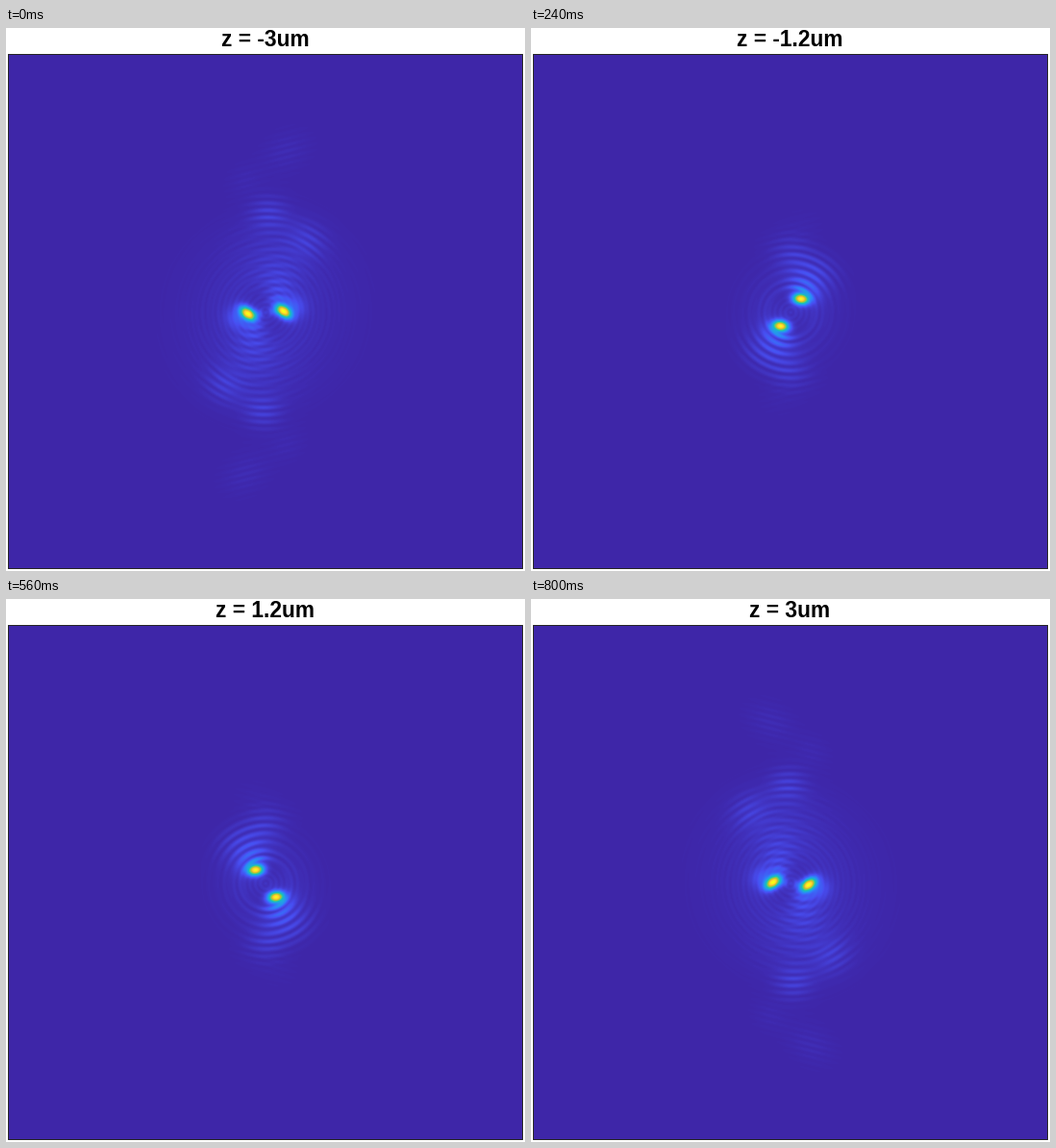
A matplotlib script for the animation above (880 ms loop, 540 px wide and 565 px high).

```python
import numpy as np
import matplotlib.pyplot as plt
from matplotlib.animation import FuncAnimation
from matplotlib.colors import LinearSegmentedColormap
from matplotlib.patches import Rectangle

W, H, DPI = 540, 565, 100
FRAMES, INTERVAL = 11, 80
LEFT, RIGHT, TOP, BOTTOM = 2, 538, 27, 563
CX, CY = 270.3, 296
DEPTH = 3

COLORS = LinearSegmentedColormap.from_list("blue_yellow", [
    "#3e26a8", "#484df0", "#327cfc", "#20a5e2", "#19bfb6",
    "#64cd6f", "#c5c22a", "#fec934", "#f9fb15"])


def gauss(x, y, x0, y0, sx, sy, tilt=0):
    t = np.radians(tilt)
    dx, dy = x - x0, y - y0
    u = dx * np.cos(t) + dy * np.sin(t)
    v = dy * np.cos(t) - dx * np.sin(t)
    return np.exp(-0.5 * ((u / sx) ** 2 + (v / sy) ** 2))


def ripple(r, period, contrast=1):
    return 1 - contrast * (0.5 - 0.5 * np.cos(2 * np.pi * r / period))


def sigmoid(v):
    return 1 / (1 + np.exp(-np.clip(v, -50, 50)))


def lobe(x, y, s):
    """Bright spot that turns a quarter circle as s goes from 0 to 1."""
    a = np.radians(90 - 86 * s - 4 * np.sin(2 * np.pi * s))
    radius = 17.5 + (2 * s - 1) ** 2
    lx, ly = radius * np.cos(a), radius * np.sin(a)
    spot = gauss(x, y, lx, ly, 3.8 + 2.6 * np.sin(2 * s), 3.8, -38 * s ** 1.8)
    side = gauss(x, y, lx + 9, ly + 4, 9, 8)
    link = gauss(x, y, 8, 1, 4, 3)
    return 0.92 * spot + 0.13 * s * side + 0.1 * s ** 3 * link


def arcs(x, y, s, reach):
    """Fan of curved fringes outside the lobe."""
    dx, dy = x - (14 * s ** 2 - 1), y - (4 - 8 * s)
    r = np.hypot(dx, dy)
    turn = np.arctan2(dy, dx) - np.radians(90 - 25 * np.sin(np.pi * s))
    fan = np.exp((np.cos(turn) - 1) / 0.38 ** 2) + 0.06
    gap = r - (26 - 6 * s ** 3)
    fade = np.exp(-np.maximum(gap, 0) / (8 + 45 * s))
    window = sigmoid((gap + 5) / 1.5) * sigmoid((reach - r) / 5)
    strength = 0.1 + 0.32 * (1 - s) ** 2
    return strength * fan * fade * window * ripple(gap, 8.4, 1 - 0.35 * s)


def patches(x, y, s, tip):
    """Weak striped patches at the tip, the shoulder and far out."""
    rows = ripple(np.hypot(x, y), 7.6, 0.8)
    out = (0.04 + 0.04 * s) * rows * gauss(x, y, 3 * s, tip, 13, 12)
    out += 0.07 * s * rows * gauss(x, y, 24 + 18 * s, 22 + 53 * s, 14, 12, -35)
    stripes = s * ripple(y - 0.25 * x, 6.5, 0.6)
    out += 0.026 * stripes * gauss(x, y, 21 * s, 33 + 135 * s, 18, 13, 30)
    out += 0.018 * stripes * gauss(x, y, -21, 28 + 110 * s, 13, 11, 30)
    return out


def glow(x, y, s):
    """Broad weak light with a dark hollow beside the lobe."""
    light = gauss(x, y, 12 * s, 8 * s, 12 + 33 * s, 12 + 42 * s, -20)
    hollow = 1 - 0.9 * gauss(x, y, -8, 19, 11, 9)
    return 0.026 * light * hollow * ripple(np.hypot(x, y), 5.5, 0.4)


def half_pattern(x, y, s):
    tip = 55 + 49 * s ** 2
    return (lobe(x, y, s) + arcs(x, y, s, tip + 5)
            + patches(x, y, s, tip) + glow(x, y, s))


gx, gy = np.meshgrid(np.arange(LEFT, RIGHT) + 0.5 - CX,
                     CY - np.arange(TOP, BOTTOM) - 0.5)


def field(z):
    """Two halves in point symmetry, mirrored beyond focus."""
    x = -gx if z > 0 else gx
    s = abs(z) / DEPTH
    return np.clip(half_pattern(x, gy, s) + half_pattern(-x, -gy, s), 0, 1)


fig = plt.figure(figsize=(W / DPI, H / DPI), dpi=DPI, facecolor="white")
ax = fig.add_axes([0, 0, 1, 1])
image = ax.imshow(np.zeros(gx.shape), cmap=COLORS, vmin=0, vmax=1,
                  extent=(LEFT, RIGHT, BOTTOM, TOP), interpolation="nearest")
ax.add_patch(Rectangle((LEFT + 0.5, TOP + 0.5), RIGHT - LEFT - 1,
                       BOTTOM - TOP - 1, fill=False, ec="#262626",
                       lw=72 / DPI, snap=False))
title = ax.text(269.5, 19, "", ha="center", va="baseline", color="black",
                family="Liberation Sans", weight="bold", size=22.7 * 72 / DPI)
ax.set_xlim(0, W)
ax.set_ylim(H, 0)
ax.set_aspect("auto")
ax.axis("off")


def update(i):
    z = round(DEPTH * (2 * i / (FRAMES - 1) - 1), 1) + 0.0
    image.set_data(field(z))
    title.set_text(f"z = {z:g}um")
    return image, title


anim = FuncAnimation(fig, update, frames=FRAMES, interval=INTERVAL,
                     repeat=True, repeat_delay=0)
plt.show()
```
